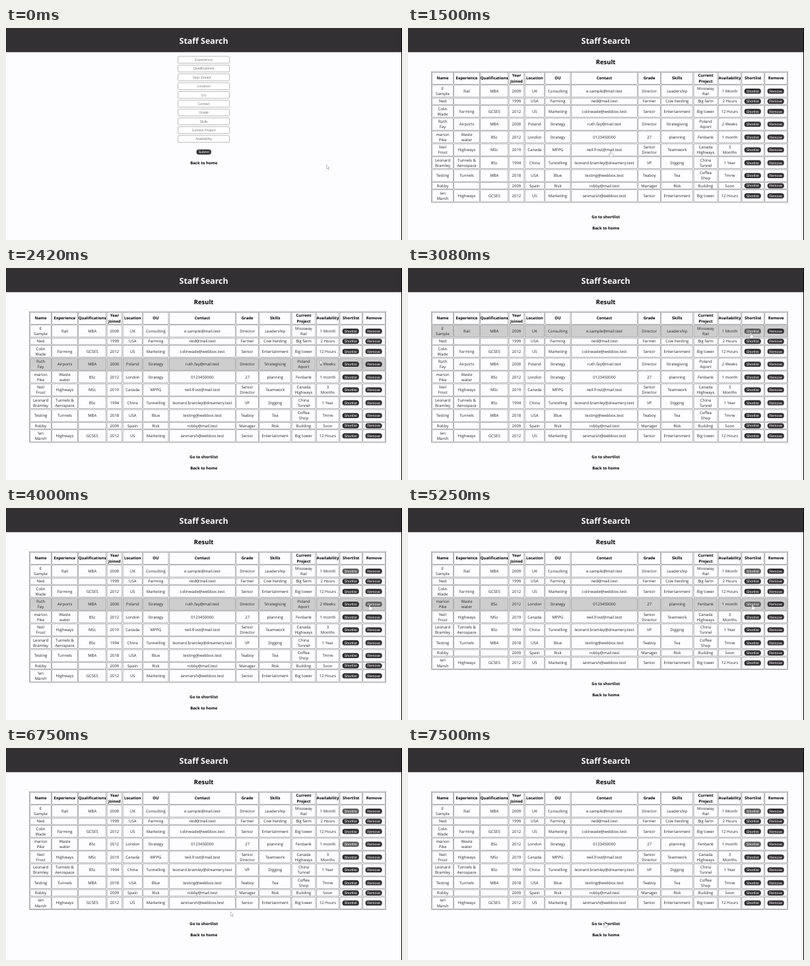
An HTML page that plays this animation: 600x322 px, repeating every 8 s.

```html
<!DOCTYPE html>
<html lang="en">
<head>
<meta charset="utf-8">
<title>Staff Search</title>
<style>
  html, body { margin: 0; width: 100%; height: 100%; overflow: hidden; background: #fdfcfe; }
  svg { display: block; width: 100vw; height: 100vh; }
  text { font: 6px "Open Sans", "Noto Sans", sans-serif; fill: #262626; text-anchor: middle; white-space: pre; text-rendering: geometricPrecision; }
  .bold { font-weight: 700; fill: #000; }
  .title { font-size: 12.4px; font-weight: 700; fill: #fff; }
  .heading { font-size: 9.4px; font-weight: 700; fill: #000; }
  .label, .field { font: 5.3px "Liberation Sans", Arial, sans-serif; fill: #fff; }
  .field { fill: #757575; }
  .cell { fill: none; stroke: #858585; stroke-width: .6; }
  .cell.lit { fill: #cecece; }
  .input { fill: #fff; stroke: #808080; stroke-width: .55; }
  .pointer { fill: #fff; stroke: #777; stroke-width: .45; stroke-linejoin: round; }
</style>
</head>
<body>
<svg id="stage" viewBox="0 0 600 322" preserveAspectRatio="none"></svg>
<script>
const DARK = '#323032', GREY = '#605f60';
const TICKS = 96, TICK_MS = 1000 / 12;
const RESULT_AT = 18, HOVER_AT = 21, REMOVE_AT = 51;
const REMOVED_ROW = 3;
const SHORTLISTED_AT = { 0: 37, 4: 61 };

const fields = ['Experience', 'Qualifications', 'Year Joined', 'Location', 'OU',
  'Contact', 'Grade', 'Skills', 'Current Project', 'Availability'];
const columns = [36, 69, 109, 152.4, 176.5, 207.2, 246.7, 348.2, 383.1, 432.4, 469.6, 505.3, 540.1, 575.2];
const header = 'Name|Experience|Qualifications|Year/Joined|Location|OU|Contact|Grade|Skills|Current/Project|Availability|Shortlist|Remove';
const people = [
  'E/Sample|Rail|MBA|2009|UK|Consulting|e.sample@mail.test|Director|Leadership|Mossway/Rail|1 Month',
  'Ned|||1999|USA|Farming|ned@mail.test|Farmer|Cow herding|Big farm|2 Hours',
  'Colin/Wade|Farming|GCSES|2012|US|Marketing|colinwade@webbox.test|Senior|Entertainment|Big tower|12 Hours',
  'Ruth/Fay|Airports|MBA|2000|Poland|Strategy|ruth.fay@mail.test|Director|Strategising|Poland/Aiport|2 Weeks',
  'marion/Pike|Waste/water|BSc|2012|London|Strategy|0123450000|27|planning|Fenbank|1 month',
  'Neil/Frost|Highways|MSc|2019|Canada|MPPG|neil.frost@mail.test|Senior/Director|Teamwork|Canada/Highways|3/Months',
  'Leonard/Bramley|Tunnels &amp;/Aerospace|BSc|1994|China|Tunnelling|leonard.bramley@dreamery.test|VP|Digging|China/Tunnel|1 Year',
  'Testing|Tunnels|MBA|2018|USA|Blue|testing@webbox.test|Teaboy|Tea|Coffee/Shop|Tmrw',
  'Robby|||2009|Spain|Risk|robby@mail.test|Manager|Risk|Building|Soon',
  'Ian/Marsh|Highways|GCSES|2012|US|Marketing|ianmarsh@webbox.test|Senior|Entertainment|Big tower|12 Hours'
];

// Pointer stops: tick, x, y, easing into the stop
const smooth = k => k * k * (3 - 2 * k);
const speedUp = k => k ** 1.4;
const slowDown = k => 1 - (1 - k) ** 1.7;
const stops = [
  [0, 485.5, 207.5], [3, 485.5, 207.5], [12, 307, 187.5, smooth],
  [20, 307, 187.5], [24, 446.5, 146.5, speedUp], [26, 474, 141, slowDown],
  [28, 474, 141], [37, 521, 97, smooth],
  [39, 521, 97], [48, 551, 147, smooth],
  [52, 551, 147], [62, 522, 146.5, smooth],
  [69, 522, 146.5], [75, 411.5, 191.5, speedUp], [78, 345, 247, slowDown],
  [79, 345, 247], [89, 298.3, 263.8, smooth], [96, 298.3, 263.8]
];

function pointerAt(tick) {
  const i = stops.findIndex(s => s[0] > tick);
  const [t0, x0, y0] = stops[i - 1], [t1, x1, y1, ease = smooth] = stops[i];
  const k = ease((tick - t0) / (t1 - t0));
  return { x: x0 + (x1 - x0) * k, y: y0 + (y1 - y0) * k };
}

const text = (str, x, y, cls = '') => `<text class="${cls}" x="${x}" y="${y}">${str}</text>`;
const rect = (x, y, w, h, attrs) => `<rect x="${x}" y="${y}" width="${w}" height="${h}" ${attrs}/>`;
const inside = (p, x, y, w, h) => Math.abs(p.x - x) < w / 2 && Math.abs(p.y - y) < h / 2;

function button(label, x, y, w, lit) {
  return rect(x - w / 2, y - 3.9, w, 7.8, `rx="3.7" fill="${lit ? GREY : DARK}"`) + text(label, x, y + 1.8, 'label');
}

function lines(str, x, y, cls) {
  const parts = str.split('/');
  return parts.map((part, i) => text(part, x, y + 2.1 + (i - (parts.length - 1) / 2) * 8.4, cls)).join('');
}

function pointer(p, hand) {
  const shape = hand
    ? 'M-.8 .6Q0 -.5 .8 .6V3L3.8 3.7Q4.4 4 4.2 5.2L3.4 8.3H-.5L-2.7 5.2Q-2.6 4.2 -1.6 4.8L-.8 5.4Z'
    : 'M0 0V6.6L1.5 5.3L2.6 7.7L3.7 7.2L2.7 4.9H4.7Z';
  return `<path class="pointer" transform="translate(${p.x} ${p.y})" d="${shape}"/>`;
}

function formPage(p) {
  const over = inside(p, 299.7, 188.4, 23, 9);
  const inputs = fields.map((name, i) => {
    const y = 48.2 + i * 13.36;
    return rect(260.7, y - 5.2, 77.9, 10.4, 'class="input" rx="1.2"') +
      text(name, name === 'Year Joined' ? 296.6 : 299.6, y + 1.9, 'field');
  });
  return inputs.join('') + button('Submit', 299.7, 188.4, 22.4, over) +
    text('Back to home', 299.7, 207.4, 'bold') + pointer(p, over);
}

function resultPage(p, tick) {
  let y = 66.6, body = '', hand = tick < HOVER_AT;

  function addRow(data, id) {
    const cells = data.split('|'), isHeader = id < 0;
    const h = data.includes('/') ? 19.5 : 11.25, mid = y + h / 2;
    const lit = !isHeader && tick >= HOVER_AT && p.x > 37 && p.x < 574 && p.y >= y && p.y < y + h;
    for (let c = 0; c < 13; c++) {
      const left = columns[c], w = columns[c + 1] - left, x = left + w / 2;
      body += rect(left + .7, y + .7, w - 1.4, h - 1.4, `class="cell ${lit ? 'lit' : ''}"`);
      if (isHeader || c < 11) {
        body += lines(cells[c], x, mid, isHeader ? 'bold' : '');
      } else {
        const over = tick >= HOVER_AT && inside(p, x, mid, 26, 9);
        const chosen = c === 11 && tick >= SHORTLISTED_AT[id];
        body += button(c === 11 ? 'Shortlist' : 'Remove', x - .5, mid + .1, 25.2, over || chosen);
        hand ||= over;
      }
    }
    y += h;
  }

  addRow(header, -1);
  people.forEach((row, id) => {
    if (id !== REMOVED_ROW || tick < REMOVE_AT) addRow(row, id);
  });
  hand ||= inside(p, 299.7, y + 21, 44, 9);
  return text('Result', 299.6, 55.2, 'heading') +
    rect(35.5, 66.1, 540.2, y - 65.6, 'class="cell"') + body +
    text('Go to shortlist', 299.7, y + 24.1, 'bold') +
    text('Back to home', 299.7, y + 41.1, 'bold') + pointer(p, hand);
}

const stage = document.getElementById('stage');
const frame = rect(0, 0, 600, 322, 'fill="#fdfcfe"') + rect(0, 0, 600, 36.7, `fill="${DARK}"`) +
  rect(599, 0, 1, 322, 'fill="#000"') + text('Staff Search', 299.6, 24, 'title');
let shown = -1;

function draw(now) {
  const tick = Math.floor(now / TICK_MS + .01) % TICKS;
  if (tick !== shown) {
    const p = pointerAt(tick);
    stage.innerHTML = frame + (tick < RESULT_AT ? formPage(p) : resultPage(p, tick));
    shown = tick;
  }
}

const start = performance.now();
function loop() {
  draw(performance.now() - start);
  requestAnimationFrame(loop);
}
loop();
</script>
</body>
</html>
```
